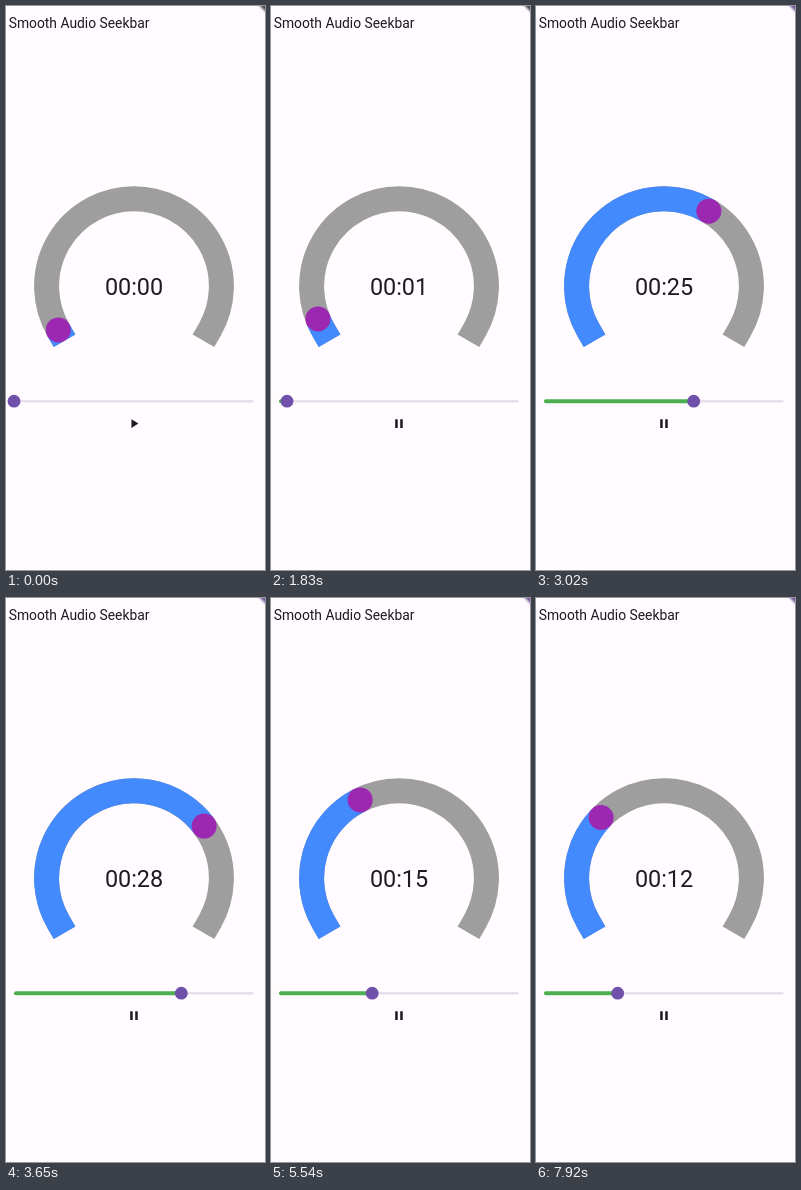
These frames come from a looping animation (259x564 px, 7.99 s). An HTML page:

```html
<!DOCTYPE html>
<html lang="en">
<head>
<meta charset="utf-8">
<title>Smooth Audio Seekbar</title>
<style>
  html, body { margin: 0; width: 100%; height: 100%; overflow: hidden; background: #fffbff; }
  svg { display: block; width: 259px; height: 564px; }
  text { font-family: Roboto, sans-serif; fill: #1c1b1f; }
</style>
</head>
<body>
<svg viewBox="0 0 259 564">
  <defs><filter id="soft"><feGaussianBlur stdDeviation=".8"/></filter></defs>
  <path id="corner" d="M251 -3H262V8Z" filter="url(#soft)"/>
  <text x="2.7" y="22" font-size="13.85">Smooth Audio Seekbar</text>
  <g fill="none" stroke-width="25">
    <path id="rail" stroke="#9e9e9e"/>
    <path id="arc" stroke="#448aff"/>
  </g>
  <circle id="knob" r="12.5" fill="#9c27b0"/>
  <text id="clock" x="128" y="288.7" font-size="23.4" text-anchor="middle"></text>
  <rect x="8" y="394" width="239.5" height="2.4" rx="1.2" fill="#e7e0ec"/>
  <rect id="bar" x="8" y="393.2" height="4" rx="2" fill="#4caf50"/>
  <circle id="thumb" cy="395.2" r="6.4" fill="#6f51a9"/>
  <path id="icon" transform="translate(120.4 410) scale(.63)" fill="#1c1b1f"/>
</svg>
<script>
const $ = id => document.getElementById(id);
const set = (id, attrs) => { for (const k in attrs) $(id).setAttribute(k, attrs[k]); };

const LOOP = 7990, START = 500, STEP = 70, LENGTH = 40;
const CX = 128, CY = 280.2, R = 87.4, CAP = 12.5, FROM = 150, SWEEP = 240;
const PLAY = 'M8 5v14l11-7z', PAUSE = 'M6 5h4v14H6zM14 5h4v14h-4z';

// [time in ms, audio position in seconds]: playback, drags and holds
const KEYS = [
  [500, 0], [1830, 1.34], [1900, 1.4], [2180, 13.7], [2250, 16.7], [2600, 22],
  [3370, 27.6], [3510, 28], [3650, 28], [4910, 33.45], [5050, 26.2], [5120, 26.2],
  [5190, 17.4], [5400, 17.4], [5540, 15.6], [5680, 15.6], [5750, 13], [5820, 10.1],
  [6030, 10.1], [6100, 10.5], [7990, 12.4]
];

function position(t) {
  const i = KEYS.findIndex(k => k[0] > t);
  if (i < 1) return 0;
  const [t0, a] = KEYS[i - 1], [t1, b] = KEYS[i];
  return a + (b - a) * (t - t0) / (t1 - t0);
}

function point(deg, along = 0) {
  const a = deg * Math.PI / 180, c = Math.cos(a), s = Math.sin(a);
  return [CX + R * c - along * s, CY + R * s + along * c];
}

// Arc with a straight extension before its start, optionally after its end
function arcPath(sweep, tail = 0) {
  const end = FROM + sweep;
  return `M${point(FROM, -CAP)}L${point(FROM)}A${R} ${R} 0 ${+(sweep > 180)} 1 ${point(end)}L${point(end, tail)}`;
}

function draw(now) {
  const raw = now % LOOP;
  const t = raw < START ? 0 : START + Math.floor((raw - START) / STEP) * STEP;
  const pos = position(t);
  // the dial runs slightly ahead of the slider in the middle of the drag
  const dial = pos + Math.max(0, .9 * (1 - Math.abs(t - 3650) / 700));
  const sweep = dial / LENGTH * SWEEP, [cx, cy] = point(FROM + sweep);
  const x = 8 + 239 * pos / LENGTH;
  set('arc', { d: arcPath(sweep) });
  set('knob', { cx, cy });
  set('bar', { width: x - 8 });
  set('thumb', { cx: x });
  set('icon', { d: t < START ? PLAY : PAUSE });
  set('corner', { fill: t < 3000 ? '#4a484d' : '#75559a' });
  $('clock').textContent = '00:' + String(Math.floor(dial)).padStart(2, '0');
  requestAnimationFrame(loop);
}

const begin = performance.now();
const loop = () => draw(performance.now() - begin);
set('rail', { d: arcPath(SWEEP, CAP) });
loop();
</script>
</body>
</html>
```
